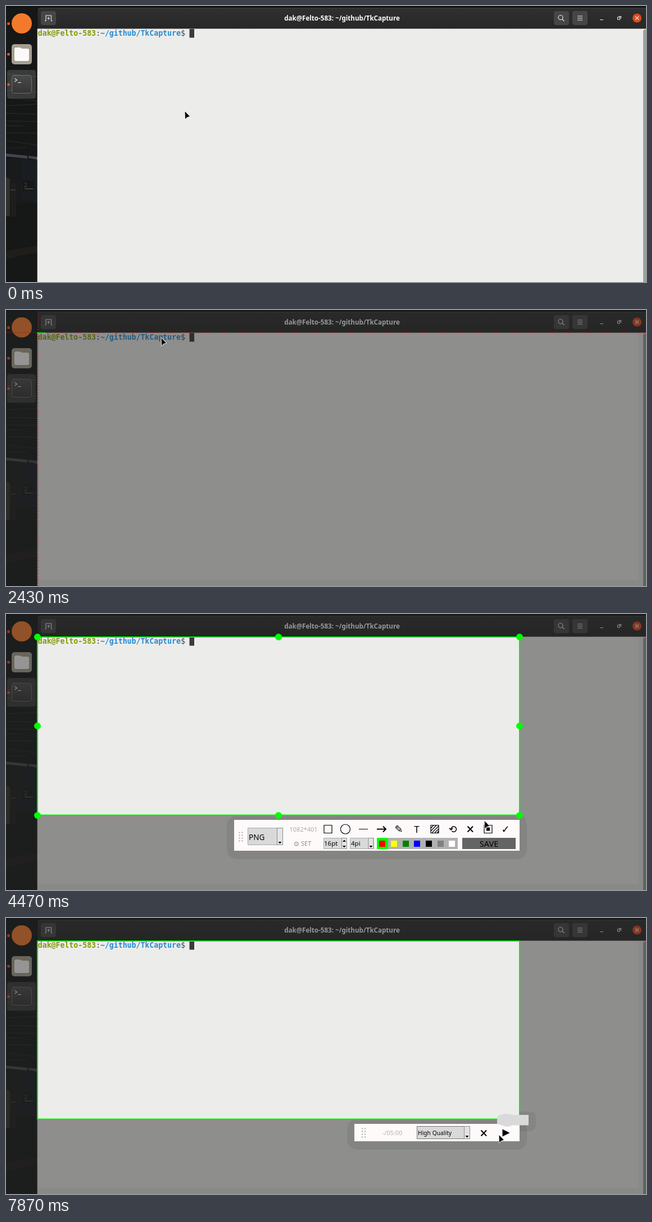
These frames come from a looping animation (1139x492 px, 8000 ms). An HTML page:

```html
<!DOCTYPE html>
<html lang="en">
<head>
<meta charset="utf-8">
<title>Screen capture demo</title>
<style>
html, body { margin: 0; width: 100%; height: 100%; overflow: hidden; background: #111; }
svg { display: block; width: 1139px; height: 492px; }
text { white-space: pre; font-family: "Noto Sans", "Noto Sans CJK SC", sans-serif; }
.panel text { font-family: "Noto Sans CJK SC", "Noto Sans CJK", sans-serif; }
.mono { font: 13.2px "DejaVu Sans Mono", monospace; fill: #444; }
.mono tspan { font-weight: bold; }
.sym { font-family: "DejaVu Sans", sans-serif; text-anchor: middle; }
.line { fill: none; stroke: #000; stroke-width: 1.2; }
.bold { stroke-width: 2; }
.white { fill: none; stroke: #eee; stroke-width: 1.1; }
.dots { fill: none; stroke-linecap: round; }
.cross { stroke: #f22020; stroke-dasharray: 2 2; vector-effect: non-scaling-stroke; }

/* One 8 s clock; hard changes unless a keyframe sets its own steps. */
.anim { animation: 8s step-end infinite; }
.solid { animation-name: solid; }
.hollow { animation-name: hollow; }
.dock { animation-name: dock; }
.intro { animation-name: intro; }
.win { animation-name: win; }
.crossing { animation-name: crossing; }
.vert { animation-name: vert; }
.horiz { animation-name: horiz; }
.dimmed { animation-name: dimmed; }
.sel { animation-name: sel; }
.edit { animation-name: edit; }
.list { animation-name: list; }
.record { animation-name: record; }
.tip { animation-name: tip; }
.mouse { animation-name: mouse; }

@keyframes solid { 0% { opacity: 1 } 2.5%, 100% { opacity: 0 } }
@keyframes hollow { 0% { opacity: 0 } 2.5%, 100% { opacity: 1 } }
@keyframes dock { 0% { opacity: 1 } 10.25% { opacity: 0 } 12.75%, 100% { opacity: 1 } }
@keyframes intro { 0% { opacity: 0 } 10.25% { opacity: .95 } 12.75%, 100% { opacity: 0 } }
@keyframes win {
  0% { opacity: 0; transform: translate(56px, 66px) scale(.902) }
  10.25% { opacity: .93; transform: translate(56px, 66px) scale(.902) }
  12.75%, 100% { opacity: 1; transform: translate(0, 0) scale(1) }
}
@keyframes crossing { 0% { opacity: 1 } 55.875%, 100% { opacity: 0 } }
@keyframes vert {
  0%, 10.25% { transform: translateX(350.9px); animation-timing-function: steps(6) }
  25.25%, 100% { transform: translateX(56.5px) }
}
@keyframes horiz {
  0%, 10.25% { transform: translateY(175.7px); animation-timing-function: steps(6) }
  25.25%, 100% { transform: translateY(40.5px) }
}
@keyframes dimmed { 0% { opacity: 0 } 30.375%, 100% { opacity: 1 } }
@keyframes sel {
  0%, 30.375% { width: 14px; height: .1px }
  32.875% { width: 330px; height: 70px; animation-timing-function: steps(3) }
  40.375% { width: 849px; height: 314.5px }
  53.375%, 100% { width: 858px; height: 317.5px }
}
@keyframes edit { 0% { opacity: 0 } 55.875% { opacity: 1 } 85.875%, 100% { opacity: 0 } }
@keyframes list { 0% { opacity: 0 } 75.875% { opacity: 1 } 85.875%, 100% { opacity: 0 } }
@keyframes record { 0% { opacity: 0 } 85.875%, 100% { opacity: 1 } }
@keyframes tip { 0% { opacity: 0 } 98.375%, 100% { opacity: 1 } }
@keyframes mouse {
  0% { transform: translate(318px, 187px) }
  10.25% { transform: translate(351px, 176px); animation-timing-function: steps(6) }
  25.25% { transform: translate(57px, 43px) }
  30.375% { transform: translate(276px, 49px); animation-timing-function: steps(4) }
  40.375% { transform: translate(905px, 357px) }
  53.375% { transform: translate(914px, 360px); animation-timing-function: steps(5) }
  65.875% { transform: translate(600px, 400px); animation-timing-function: steps(3) }
  73.375% { transform: translate(487px, 404px); animation-timing-function: steps(3) }
  80.875% { transform: translate(457px, 436px) }
  83.375% { transform: translate(452px, 438px); animation-timing-function: steps(5) }
  95.875% { transform: translate(815px, 387px) }
  98.375%, 100% { transform: translate(877px, 386px) }
}
</style>
</head>
<body>
<svg viewBox="0 0 1139 492">
<defs>
  <linearGradient id="bar" x2="0" y2="1">
    <stop stop-color="#303030"/><stop offset="1" stop-color="#272727"/>
  </linearGradient>
  <linearGradient id="tile" x2="0" y2="1">
    <stop stop-color="#4a4a4a"/><stop offset="1" stop-color="#353535"/>
  </linearGradient>

  <g id="wall">
    <path fill="#060707" d="M0 0H1139V492H0Z"/>
    <path fill="#2c211a" d="M400 0h50v3h-50zM465 0h90v3h-90z"/>
    <path fill="#a9b4b8" d="M570 0h50v3h-50zM703 0h60v3h-60z"/>
    <g fill="none" stroke="#6b6250">
      <path d="M0 121l56 5M0 150l56 3M0 178l56-3M0 191l56 2M0 205l56 1M0 213l30 1M0 226l56 1"/>
      <path stroke="#403c34" stroke-width="1.500" d="M4 135l36-4M6 164l50 5M0 240l56 8M0 254l35-2"/>
    </g>
    <path fill="#12151c" d="M0 272h56v80H0z"/>
    <path fill="#141d2d" d="M27 276h29v74l-29-6z"/>
    <path fill="#d6ccff" d="M0 263l38 4v5l-38-4zM40 267l16 2v5l-16-3z"/>
    <path fill="#7d7662" d="M0 305l7 4v66H0z"/>
    <path fill="#262522" d="M9 315h9v60H9z"/>
    <path fill="#08090b" d="M30 311h20v19H30z"/>
    <path fill="#b9b9b9" d="M33 325h15v2H33zM8 327h9v1.500H8z"/>
    <text x="32" y="323" font-size="10" fill="#ddd">2</text>
    <path fill="#2e2618" d="M0 437Q30 430 56 428V439Q28 444 0 452Z"/>
  </g>

  <g id="term">
    <path fill="url(#bar)" d="M56 41V7q0-4 4-4H1139V41z"/>
    <path stroke="#414141" d="M59 3.500H1139"/>
    <path fill="#ececeb" d="M55.500 40.500H1139V492H55.500z"/>
    <g fill="#464646">
      <rect x="62" y="9" width="27" height="25" rx="4"/>
      <rect x="975" y="9" width="27" height="25" rx="4"/>
      <rect x="1008" y="9" width="27" height="25" rx="4"/>
    </g>
    <path class="white" d="M69 26.500h2v-9.500h9.500v9.500h2M75.700 19.500v5M73.200 22h5"/>
    <circle class="white" cx="987" cy="20.500" r="4"/>
    <path class="white" d="M990 23.500l3.500 3.500M1017 18h9M1017 21.500h9M1017 25h9M1057 24.500h6M1088.500 20h4v4h-4zM1090.500 18.500h4v4"/>
    <circle cx="1123" cy="21.500" r="8" fill="#e0481c"/>
    <path class="white" d="M1120 18.500l6 6m0-6l-6 6"/>
    <text x="598" y="25.500" font-size="11.600" font-weight="bold" fill="#fff" text-anchor="middle">dak@Felto-583: ~/github/TkCapture</text>
    <text class="mono" x="56.800" y="53"><tspan fill="#859900">dak@Felto-583</tspan>:<tspan fill="#268bd2">~/github/TkCapture</tspan>$</text>
  </g>

  <g id="dock">
    <path fill="#1c1d1d" fill-opacity=".78" d="M0 0H55.500V492H0z"/>
    <path fill="#101111" d="M0 0H1139V3H0z"/>
    <rect x="2" y="114" width="51" height="51" rx="4" fill="#fff" fill-opacity=".15"/>
    <circle cx="28" cy="31" r="18" fill="#f47a2b"/>
    <rect x="10" y="68" width="36" height="36" rx="5" fill="#a49f90"/>
    <path fill="#fbfaf8" d="M15 77q0-3 3-3h7l3 2h10q3 0 3 3v16q0 3-3 3H18q-3 0-3-3z"/>
    <rect x="10.500" y="123.500" width="35" height="32" rx="4" fill="url(#tile)" stroke="#6d6d6d"/>
    <path class="white" d="M15.500 129l4 3-4 3M21 136.500h6"/>
    <path class="dots" stroke="#e2511f" stroke-width="5" d="M4.500 31.500h0M4.500 86h0M4.500 140h0"/>
    <path fill="#9e9e9c" d="M1134 492V45q0-3 3-3h2V492z"/>
  </g>
  <path id="block" fill="#3a3a3a" d="M326.500 41h8.500v15.500h-8.500z"/>
  <path id="grip" class="dots" stroke="#b9b5b5" stroke-width="2.600" d="M0 0h0M5 0h0M0 5h0M5 5h0M0 10h0M5 10h0M0 15h0M5 15h0"/>
  <g id="drop">
    <path fill="#e4e4e4" stroke="#8d8d8d" d="M.5.500h9v-19h-9z"/>
    <path d="M2-5h6l-3 3.500z"/>
  </g>

  <mask id="hole" maskUnits="userSpaceOnUse" x="0" y="0" width="1139" height="492">
    <path fill="#fff" d="M0 0H1139V492H0z"/>
    <rect class="anim sel" x="56" y="41"/>
  </mask>
</defs>

<!-- live desktop -->
<use href="#wall"/>
<use href="#term"/>
<use class="anim dock" href="#dock"/>
<use class="anim solid" href="#block"/>
<path class="anim hollow" fill="none" stroke="#3a3a3a" d="M326.500 41.500h8v15h-8z"/>

<!-- top panel, seen only while the capture window opens -->
<g class="anim intro panel">
  <path fill="#222" d="M56 50H1085V67H56z"/>
  <g fill="#eee" font-size="10.800">
    <text x="64" y="63">活动</text>
    <text x="125" y="62">...</text>
    <text x="596" y="63" text-anchor="middle">4月5日 18：37</text>
    <text x="964" y="63">英</text>
    <circle cx="644" cy="58.500" r="3"/>
    <path d="M140.500 57h7l-3.500 4zM978.500 57h7l-3.500 4zM1067.500 57h7l-3.500 4zM1012 54h4v3h-4zM1008.500 60h4v3h-4zM1015.500 60h4v3h-4zM1029 57h2l3-3v9l-3-3h-2z"/>
  </g>
  <path class="white" d="M110.500 54.500h10v8h-10zM112 57l2 1.500-2 1.500M1014 57v2h-3.500v2M1014 59h3.500v2M1036 56q2.500 2.500 0 5M1038 55q3 3.500 0 7M1051 55.500a4 4 0 1 0 6 0M1054 54v4"/>
</g>

<!-- frozen screenshot window -->
<g class="anim win">
  <use href="#wall"/>
  <use href="#term"/>
  <use href="#dock"/>
  <use href="#block"/>
  <g class="anim crossing">
    <path class="cross anim vert" d="M0-18V492"/>
    <path class="cross anim horiz" d="M0 0H1139"/>
  </g>
</g>
<path class="anim intro" fill="none" stroke="#12e812" stroke-width="2" d="M56 65.500H1084V492"/>

<g class="anim dimmed">
  <g mask="url(#hole)">
    <path fill="#262626" fill-opacity=".47" d="M0 0H1139V492H0z"/>
    <path fill-opacity=".03" d="M1126 41h13V492H56V481H1126z"/>
  </g>
  <path class="anim edit" fill-opacity=".07" d="M406 360H921q6 10 6 20v37q0 20-20 20H413q-20 0-20-20V378q0-14 13-18z"/>
  <path class="anim record" fill-opacity=".07" d="M616 360H921q6 10 6 20v13q0 20-20 20H627q-20 0-20-20V380q0-14 9-20z"/>
  <rect class="anim sel" x="56" y="41" fill="none" stroke="#0aec0a" stroke-width="2"/>
</g>

<!-- editing toolbar -->
<g class="anim edit">
  <path class="dots" stroke="#0f0" stroke-width="12" d="M56 41h0M485 41h0M914 41h0M56 199.500h0M914 199.500h0M56 359h0M485 359h0M914 359h0"/>
  <path fill="#fffafa" d="M406 367H914V422H406z"/>
  <use href="#grip" x="415.500" y="389.500"/>
  <path fill="#d9d9d9" stroke="#a8a8a8" d="M430.500 381.500h62v30h-62zM565.500 399.500h41v19h-41zM612.500 399.500h42v19h-42z"/>
  <path fill="#e4e4e4" stroke="#8d8d8d" d="M482.500 381.500h10v30h-10z"/>
  <path d="M484.500 406h6l-3 3.500z"/>
  <use href="#drop" x="597" y="418"/>
  <path d="M599 406h6l-3-3.500z"/>
  <use href="#drop" x="644.500" y="418"/>
  <text x="432" y="403" font-size="13.500">PNG</text>
  <text x="566" y="413" font-size="11.500">16pt</text>
  <text x="614" y="413" font-size="11.500">4pi</text>
  <text x="504.500" y="387.500" font-size="11" fill="#aaa">1082*401</text>
  <text x="525" y="413" font-size="11" fill="#8c8c8c">SET</text>
  <text class="sym" x="517" y="413.500" font-size="12" fill="#999">⚙</text>

  <path class="line" d="M566 376.500h14v14h-14zM628 383.500h16M756 376.500h14v14h-14zM756 382l5-5.500M756 387l10-10.500M758 390l12-12M763 390l7-7M767 390l3-3M851 376.500h14v14h-14z"/>
  <path class="line bold" d="M660 383.500h15M671 378.500l5 5-5 5M821.500 378.500l9.500 10m0-10l-9.500 10"/>
  <circle class="line" cx="604" cy="383.500" r="8.500"/>
  <path d="M855 380.500h6v6h-6z"/>
  <g font-size="18">
    <text class="sym" x="699" y="390">✎</text>
    <text class="sym" x="795" y="390">⟲</text>
    <text class="sym" x="889" y="390">✓</text>
  </g>
  <text x="731" y="389.500" font-size="17" font-weight="500" text-anchor="middle">T</text>

  <path fill="#b1b1b1" d="M660 399H804V419H660z"/>
  <path fill="#0f0" d="M660 399h20v20h-20z"/>
  <path fill="red" d="M664 404h11v11h-11z"/>
  <path fill="#ff0" d="M685 404h11v11h-11z"/>
  <path fill="green" d="M706 404h11v11h-11z"/>
  <path fill="#00f" d="M726 404h11v11h-11z"/>
  <path d="M747 404h11v11h-11z"/>
  <path fill="gray" d="M768 404h11v11h-11z"/>
  <path fill="#fff" d="M788 404h11v11h-11z"/>
  <path fill="#646464" d="M812 399h95v20h-95z"/>
  <text x="859.500" y="414.500" font-size="14.500" text-anchor="middle">SAVE</text>
</g>

<g class="anim list" font-size="13">
  <path fill="#fff" stroke="#888" d="M430.500 412.500h62v37h-62z"/>
  <path fill="#d0d0d0" d="M431 431h61v18h-61z"/>
  <text x="433" y="426">PNG</text>
  <text x="433" y="445">GIF</text>
</g>

<!-- recording toolbar -->
<g class="anim record">
  <path fill="#fffafa" d="M620 367H914V398H620z"/>
  <use href="#grip" x="634" y="375.500"/>
  <text x="669.500" y="387" font-size="11" fill="#b3b0b0">-/05:00</text>
  <path fill="#d9d9d9" stroke="#777" d="M731.500 371.500h94v22h-94z"/>
  <path fill="#e4e4e4" stroke="#8d8d8d" d="M815.500 371.500h10v22h-10z"/>
  <path d="M817.500 388h6l-3 3.500z"/>
  <text x="733" y="387" font-size="10.300" font-weight="500">High Quality</text>
  <path class="line bold" d="M845.500 378.500l9.500 10m0-10l-9.500 10"/>
  <path d="M883.500 376.500l13 6.500-13 6.500z"/>
</g>
<g class="anim tip">
  <path fill-opacity=".06" d="M914 345h18q11 0 11 12v11q0 12-13 12h-16z"/>
  <path fill="#d9d9d9" d="M930 351v18.500h-29q-8 4-16 1t-11-3v-12q3-5 12-6 9-1 16 1.500z"/>
</g>

<path class="anim mouse" d="M.5 1L1 14.500 4.200 11.200 9 9.800Z" stroke="#fff" stroke-width="1.600" paint-order="stroke" stroke-linejoin="round"/>
</svg>
</body>
</html>
```
